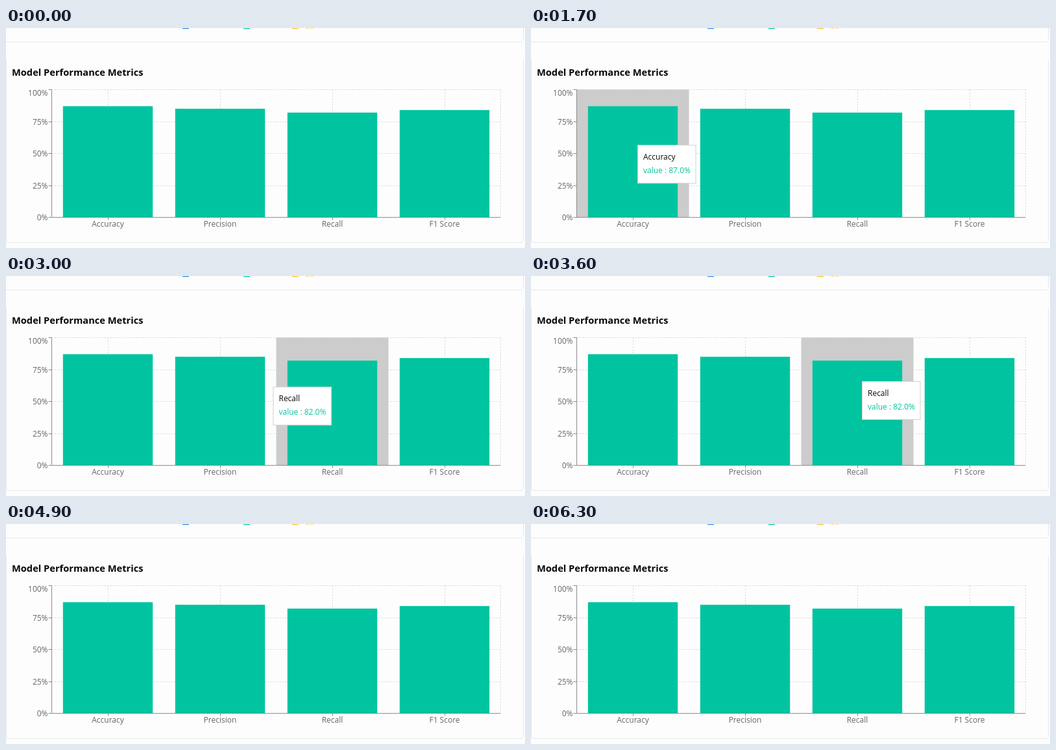
These frames come from a looping animation (800x341 px, 7 s). An HTML page with a canvas:

```html
<!DOCTYPE html>
<html lang="en">
<head>
<meta charset="utf-8">
<title>Model Performance Metrics</title>
<style>
  html, body { margin: 0; width: 100%; height: 100%; overflow: hidden; background: #fdfdfd; }
  canvas { display: block; width: 100vw; height: 100vh; }
</style>
</head>
<body>
<canvas id="stage" width="800" height="341"></canvas>
<script>
const ctx = document.getElementById('stage').getContext('2d');
const LOOP = 7000, STEP = 100, GLIDE = 500;
const FONT = '"Open Sans", "Noto Sans", sans-serif';
const PAGE = '#fdfdfd', GREEN = '#00c49f', GRID = '#d6d6da', LABEL = '#666';
const EDGE = '#e5e7eb', AXIS = '#8c8c8c', INK = '#080808';
const plot = { left: 70.5, right: 762.5, top: 95.5, bottom: 293.5, band: 173 };
const bars = [
  { name: 'Accuracy', value: 87 },
  { name: 'Precision', value: 85 },
  { name: 'Recall', value: 82 },
  { name: 'F1 Score', value: 84 }
];

// Hovered bar: [from, to, index]
const hovers = [[400, 500, 0], [700, 1800, 0], [1800, 2900, 1],
  [2900, 3900, 2], [3900, 4900, 3], [6200, 6300, 0]];

// Tooltip glides: [start, target x, target y]
const origin = [21, 92];
const glides = [[380, 164.5, 150], [680, 164.5, 168], [1450, 164.5, 185],
  [1770, 337.5, 178.5], [2870, 510.5, 163.5], [3880, 579, 165],
  [4680, 579, 175], [6150, 164.5, 170]];

// CSS "ease", cubic-bezier(.25, .1, .25, 1)
function ease(p) {
  if (p <= 0) return 0;
  if (p >= 1) return 1;
  const bez = (a, b, u) => 3 * a * u * (1 - u) ** 2 + 3 * b * u * u * (1 - u) + u ** 3;
  let lo = 0, hi = 1;
  for (let i = 0; i < 20; i++) {
    const mid = (lo + hi) / 2;
    if (bez(0.25, 0.25, mid) < p) lo = mid; else hi = mid;
  }
  return bez(0.1, 1, lo);
}

function tipAt(t) {
  return glides.reduce(([x, y], [start, toX, toY]) => {
    const k = ease((t - start) / GLIDE);
    return [x + (toX - x) * k, y + (toY - y) * k];
  }, origin);
}

function rect(x, y, w, h, color) {
  ctx.fillStyle = color;
  ctx.fillRect(x, y, w, h);
}

function line(x1, y1, x2, y2, color, dash = []) {
  ctx.strokeStyle = color;
  ctx.lineWidth = 1;
  ctx.setLineDash(dash);
  ctx.beginPath();
  ctx.moveTo(x1, y1);
  ctx.lineTo(x2, y2);
  ctx.stroke();
  ctx.setLineDash([]);
}

function text(str, x, y, color, align = 'left', font = '12px') {
  ctx.font = `${font} ${FONT}`;
  ctx.textAlign = align;
  ctx.fillStyle = color;
  ctx.fillText(str, x, y);
}

function drawPage() {
  rect(0, 0, 800, 341, PAGE);
  rect(272, 0, 10, 1.3, '#2f93f0');
  rect(366, 0, 10, 1.3, '#10c8a4');
  rect(441, 0, 10, 1.3, '#fcc235');
  text('gg', 462, -2, '#fcc868');
  line(0, 21.5, 796, 21.5, EDGE);
  line(797.5, 0, 797.5, 20, EDGE);
  ctx.strokeStyle = EDGE;
  ctx.beginPath();
  ctx.moveTo(797.5, 50);
  ctx.lineTo(797.5, 328);
  ctx.quadraticCurveTo(797.5, 332.5, 793, 332.5);
  ctx.lineTo(4, 332.5);
  ctx.quadraticCurveTo(0.5, 332.5, 0.5, 328);
  ctx.lineTo(0.5, 50);
  ctx.stroke();
  text('Model Performance Metrics', 9, 74, INK, 'left', 'bold 14.65px');
}

function drawChart(active) {
  const { left, right, top, bottom, band } = plot;
  const height = bottom - top;
  const center = i => left + band * (i + 0.5);
  for (let i = 0; i < 4; i++) {
    const y = Math.floor(top + height * i / 4) + 0.5;
    line(left, y, right, y, GRID, [2.25, 2.25]);
    const x = Math.floor(center(i)) + 0.5;
    line(x, top, x, bottom, GRID, [2.25, 2.25]);
  }
  line(right, top, right, bottom, GRID, [2.25, 2.25]);

  if (active >= 0) rect(left + band * active, top, band, height, '#ccc');
  bars.forEach(({ name, value }, i) => {
    const h = height * value / 100;
    rect(left + band * (i + 0.1), bottom - h, band * 0.8, h, GREEN);
    text(name, center(i), 307.5, LABEL, 'center');
  });

  line(left, top, left, bottom, AXIS);
  line(left, bottom, right, bottom, AXIS);
  for (let i = 0; i <= 4; i++) {
    const y = Math.floor(bottom - height * i / 4) + 0.5;
    line(left - 5, y, left, y, AXIS);
    text(`${i * 25}%`, 64.5, i === 4 ? 105 : y + 4.5, LABEL, 'right');
    if (i < 4) {
      const x = Math.floor(center(i)) + 0.5;
      line(x, bottom, x, bottom + 4, AXIS);
    }
  }
}

function drawTip({ name, value }, [x, y]) {
  rect(x, y, 89.5, 59, '#fff');
  ctx.strokeStyle = '#d2d2d2';
  ctx.lineWidth = 1;
  ctx.strokeRect(x, y, 89.5, 59);
  text(name, x + 8.5, y + 22, INK);
  text(`value : ${value.toFixed(1)}%`, x + 8.5, y + 43, GREEN);
}

function draw(now) {
  const t = Math.floor((now % LOOP) / STEP) * STEP;
  const hover = hovers.find(([from, to]) => t >= from && t < to);
  const active = hover ? hover[2] : -1;
  drawPage();
  drawChart(active);
  if (hover) drawTip(bars[active], tipAt(t));
}

const begin = performance.now();
function tick() {
  draw(performance.now() - begin);
  requestAnimationFrame(tick);
}
tick();
</script>
</body>
</html>
```
